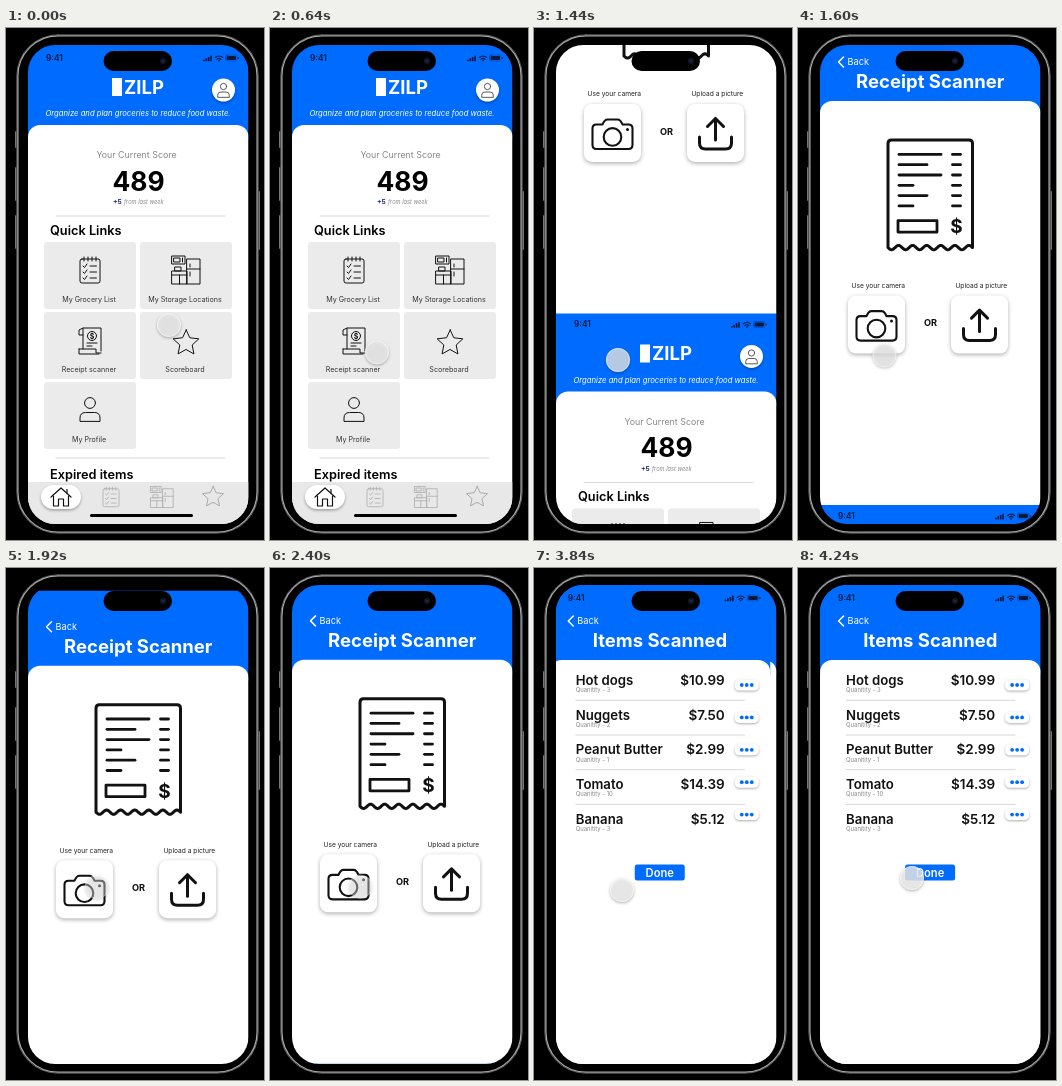
An HTML page with a canvas for the animation above (4.32 s loop, 258 by 512 pixels).

```html
<!DOCTYPE html>
<html lang="en">
<head>
<meta charset="utf-8">
<title>Grocery app</title>
<style>
html, body { margin: 0; width: 100%; height: 100%; overflow: hidden; background: #000; }
canvas { display: block; width: 258px; height: 512px; }
</style>
</head>
<body>
<canvas id="stage"></canvas>
<script>
const W = 258, H = 512, LOOP = 4320;
const SCREEN = { x: 22, y: 17, w: 220.5, h: 479 };
const BOTTOM = SCREEN.y + SCREEN.h;
const BLUE = '#006cff', INK = '#111', NAVY = '#06183f';
const canvas = document.getElementById('stage');
const c = canvas.getContext('2d');
const dpr = window.devicePixelRatio || 1;
canvas.width = W * dpr;
canvas.height = H * dpr;

// ---------- helpers ----------
function at(x, y, draw) {
  c.save();
  c.translate(x, y);
  draw();
  c.restore();
}

function box(x, y, w, h, r, fill) {
  c.beginPath();
  c.roundRect(x, y, w, h, r);
  if (fill) { c.fillStyle = fill; c.fill(); }
}

function disc(x, y, r, fill) {
  c.beginPath();
  c.arc(x, y, r, 0, Math.PI * 2);
  if (fill) { c.fillStyle = fill; c.fill(); }
}

function lifted(draw, blur = 3, dy = 1.5, color = 'rgba(0,0,0,.32)') {
  c.save();
  c.shadowColor = color;
  c.shadowBlur = blur * dpr;
  c.shadowOffsetY = dy * dpr;
  draw();
  c.restore();
}

function line(...p) {
  c.beginPath();
  c.moveTo(p[0], p[1]);
  for (let i = 2; i < p.length; i += 2) c.lineTo(p[i], p[i + 1]);
  c.stroke();
}

function pen(color, width) {
  c.strokeStyle = color;
  c.lineWidth = width;
  c.lineCap = c.lineJoin = 'round';
}

// y is the middle of the capitals
function text(s, x, y, size, { color = INK, weight = 400, align = 'left', style = '' } = {}) {
  c.font = `${style} ${weight} ${size}px Inter, "Liberation Sans", sans-serif`;
  c.textAlign = align;
  c.textBaseline = 'alphabetic';
  c.fillStyle = color;
  c.fillText(s, x, y + size * 0.364);
}

function rule(x1, x2, y, color = '#cfcfcf') {
  pen(color, 0.8);
  line(x1, y, x2, y);
}

// ---------- icons, centred on 0,0 ----------
function listIcon() {
  box(-10, -11, 20, 24, 2); c.stroke();
  for (let x = -6; x <= 6; x += 4) line(x, -13, x, -9);
  for (let y = -4; y <= 8; y += 6) {
    line(-7, y, -5.5, y + 1.5, -3, y - 2);
    line(0, y, 6.5, y);
  }
}

function fridgeIcon() {
  c.strokeRect(1, -11, 13, 25);
  line(1, -1, 14, -1);
  line(4, -6, 4, -3);
  line(4, 2, 4, 6);
  c.strokeRect(-14, -14, 13, 8);
  c.strokeRect(-12, -12, 6, 4);
  line(-3.5, -12, -3.5, -8);
  c.strokeRect(-14, 1, 15, 13);
  line(-14, 5, 1, 5);
  line(-6.5, 5, -6.5, 14);
  c.strokeRect(-11, -3, 6, 4);
}

function starIcon(r) {
  c.beginPath();
  for (let i = 0; i < 10; i++) {
    const a = -Math.PI / 2 + i * Math.PI / 5, d = i % 2 ? r * 0.48 : r;
    c.lineTo(d * Math.cos(a), d * Math.sin(a));
  }
  c.closePath();
  c.stroke();
}

function personIcon() {
  disc(0, -6, 5.4); c.stroke();
  c.beginPath();
  c.moveTo(-10, 12);
  c.lineTo(-10, 9);
  c.quadraticCurveTo(-10, 3.5, -4.5, 3.5);
  c.lineTo(4.5, 3.5);
  c.quadraticCurveTo(10, 3.5, 10, 9);
  c.lineTo(10, 12);
  c.closePath();
  c.stroke();
}

function billIcon() {
  line(-7, 8, -7, -13, 11, -13, 11, 10);
  line(-7, -13, -11, -11, -11, -6, -7, -6);
  line(-11, 8, 6, 8, 6, 12, 11, 12);
  line(-11, 8, -11, 13, 9, 13);
  disc(2, -5, 4.5); c.stroke();
  text('$', 2, -5, 7, { weight: 700, align: 'center' });
  line(-3, 2, 7, 2);
  line(-3, 5, 2, 5);
}

function houseIcon() {
  line(-10, 0, 0, -9, 10, 0);
  line(-7.5, -1, -7.5, 9, -2.5, 9, -2.5, 2, 2.5, 2, 2.5, 9, 7.5, 9, 7.5, -1);
  line(6, -7.5, 6, -4);
}

function cameraIcon() {
  c.beginPath();
  c.moveTo(-16, -8.5);
  c.lineTo(-10, -8.5);
  c.quadraticCurveTo(-8, -13.5, -5, -13.5);
  c.lineTo(5, -13.5);
  c.quadraticCurveTo(8, -13.5, 10, -8.5);
  c.lineTo(16, -8.5);
  c.quadraticCurveTo(20, -8.5, 20, -4.5);
  c.lineTo(20, 12);
  c.quadraticCurveTo(20, 16, 16, 16);
  c.lineTo(-16, 16);
  c.quadraticCurveTo(-20, 16, -20, 12);
  c.lineTo(-20, -4.5);
  c.quadraticCurveTo(-20, -8.5, -16, -8.5);
  c.stroke();
  disc(0, 4, 8.8); c.stroke();
  disc(15, -3.5, 1.5, INK);
}

function uploadIcon() {
  line(0, 7, 0, -14);
  line(-8, -6.5, 0, -14.5, 8, -6.5);
  c.beginPath();
  c.moveTo(-16, 4);
  c.lineTo(-16, 10);
  c.quadraticCurveTo(-16, 16, -10, 16);
  c.lineTo(10, 16);
  c.quadraticCurveTo(16, 16, 16, 10);
  c.lineTo(16, 4);
  c.stroke();
}

// ---------- shared page parts ----------
function page(cardTop) {
  c.fillStyle = BLUE;
  c.fillRect(SCREEN.x, SCREEN.y, SCREEN.w, cardTop + 15 - SCREEN.y);
  box(SCREEN.x, cardTop, SCREEN.w, BOTTOM - cardTop, [12, 12, 0, 0], '#fff');
}

function statusBar() {
  text('9:41', 40, 30, 8.3, { weight: 600, color: NAVY });
  for (let i = 0; i < 4; i++) box(197 + i * 2.4, 31.5 - i * 1.3, 1.7, 1.8 + i * 1.3, 0.4, NAVY);
  pen(NAVY, 1.2);
  for (const r of [2.7, 5]) {
    c.beginPath();
    c.arc(213, 33, r, -Math.PI * 0.75, -Math.PI * 0.25);
    c.stroke();
  }
  disc(213, 32.6, 0.9, NAVY);
  pen('rgba(6,24,63,.5)', 0.6);
  box(219.5, 27, 11.5, 6, 1.7); c.stroke();
  box(220.5, 28, 9.5, 4, 1, NAVY);
  box(231.8, 29, 0.9, 2, 0.4, NAVY);
}

function header(title) {
  pen('#fff', 1.5);
  line(45.5, 48, 40.5, 53, 45.5, 58);
  text('Back', 49.5, 53, 9.2, { color: '#fff' });
  text(title, 132.2, 72.5, 18.5, { color: '#fff', weight: 700, align: 'center' });
}

// ---------- pages ----------
function tile(x, y, label, icon, dy = 0) {
  box(x, y, 92, 67, 3, '#ebebeb');
  pen(INK, 1);
  at(x + 46, y + 28 + dy, icon);
  text(label, x + 45, y + 57.5, 7.15, { align: 'center', color: '#333' });
}

function home() {
  page(97);
  statusBar();
  box(106, 50, 10, 18, 0, '#fff');
  text('ZILP', 118, 59, 18.5, { weight: 700, color: '#fff' });
  lifted(() => disc(217.5, 62, 11.5, '#fff'));
  pen('#333', 1.4);
  at(217.5, 62, () => { c.scale(0.58, 0.58); personIcon(); });
  text('Organize and plan groceries to reduce food waste.', 132, 85.5, 7.7,
    { color: '#fff', style: 'italic', align: 'center' });

  text('Your Current Score', 130.5, 127, 8.85, { color: '#888', align: 'center' });
  text('489', 132.5, 153, 26.4, { weight: 700, align: 'center', color: '#000' });
  text('+5', 107, 174, 6.8, { weight: 700, color: '#1c2f72' });
  text('from last week', 118, 174, 5.7, { style: 'italic', color: '#888' });
  rule(50, 219, 188);
  text('Quick Links', 44, 202, 12.75, { weight: 600, color: '#000' });

  tile(38, 214, 'My Grocery List', listIcon);
  tile(134, 214, 'My Storage Locations', fridgeIcon);
  tile(38, 284, 'Receipt scanner', billIcon, 1);
  tile(134, 284, 'Scoreboard', () => starIcon(13.5), 3);
  tile(38, 354, 'My Profile', personIcon, -1);
  rule(50, 219, 430);
  text('Expired items', 44, 446, 12.75, { weight: 600, color: '#000' });

  c.fillStyle = '#e8e8e8';
  c.fillRect(SCREEN.x, 454, SCREEN.w, BOTTOM - 454);
  lifted(() => box(35, 457, 40, 24, 12, '#fff'));
  pen(INK, 1.2);
  at(55, 469, houseIcon);
  pen('#aaa', 1);
  at(105, 469, () => { c.scale(0.8, 0.75); listIcon(); });
  at(156, 469, () => { c.scale(0.8, 0.75); fridgeIcon(); });
  at(207, 469, () => starIcon(11));
  box(84, 486, 103, 3, 1.5, '#000');
}

function bigReceipt() {
  pen(INK, 3);
  c.beginPath();
  c.moveTo(90, 238.5);
  c.lineTo(90, 134.5);
  c.quadraticCurveTo(90, 131, 93.5, 131);
  c.lineTo(171, 131);
  c.quadraticCurveTo(174.5, 131, 174.5, 134.5);
  c.lineTo(174.5, 238.5);
  for (let k = 0; k <= 84; k++)
    c.lineTo(174.5 - k * 84.5 / 84, 238.5 - 2.2 * Math.sin(k / 84 * Math.PI * 12));
  c.stroke();
  pen(INK, 2.8);
  [42, 28, 42, 14, 28, 14].forEach((len, i) => {
    const y = 145.3 + i * 10.3;
    line(101, y, 101 + len, y);
    line(154.5, y, 162.5, y);
  });
  c.strokeRect(100, 211.5, 39, 11.5);
  text('$', 158.5, 217.3, 19, { weight: 700, align: 'center' });
}

function choice(x, label, icon) {
  text(label, x + 30.3, 276.5, 6.65, { align: 'center', color: '#222' });
  lifted(() => box(x, 286.5, 57, 58, 8, '#fff'), 4, 1.5);
  at(x + 28.5, 315.5, icon);
}

function scanner() {
  page(92);
  header('Receipt Scanner');
  bigReceipt();
  choice(50, 'Use your camera', () => { pen(INK, 2.1); cameraIcon(); });
  choice(153, 'Upload a picture', () => { pen(INK, 3); uploadIcon(); });
  text('OR', 132.6, 313.7, 9.2, { weight: 700, align: 'center' });
}

const GOODS = [
  ['Hot dogs', '$10.99', 3],
  ['Nuggets', '$7.50', 2],
  ['Peanut Butter', '$2.99', 1],
  ['Tomato', '$14.39', 10],
  ['Banana', '$5.12', 3]
];

function items() {
  page(92);
  statusBar();
  header('Items Scanned');
  GOODS.forEach(([name, price, count], i) => {
    const y = 112 + i * 34.7, dotY = 117 + i * 32.4;
    text(name, 48, y, 13.2, { weight: 600 });
    text(price, 197, y, 13.5, { weight: 600, align: 'right' });
    text('Quanitity - ' + count, 48, y + 10, 5.9, { color: '#888' });
    if (i < 4) rule(48, 217, y + 20.3);
    lifted(() => box(207, dotY - 5.5, 24, 11, 4.5, '#fff'), 2.5, 1);
    for (const dx of [-5, 0, 5]) disc(219 + dx, dotY, 1.9, BLUE);
  });
  box(107, 296.5, 50, 16, 2.5, BLUE);
  text('Done', 132, 304.5, 11.2, { weight: 600, align: 'center', color: '#fff' });
}

// ---------- motion ----------
const PUSH_AT = 1280, SLIDE_AT = 3360, TRAVEL = 477;

// damped spring: mass 1, stiffness 100, damping 15
function spring(ms) {
  if (ms <= 0) return 0;
  const t = ms / 1000, w = Math.sqrt(43.75);
  return 1 - Math.exp(-7.5 * t) * (Math.cos(w * t) + 7.5 / w * Math.sin(w * t));
}

// time, x, y, opacity
const POINTER = [
  [0, 163, 297, 0.75], [160, 163, 297, 0.75], [900, 85, 335, 0.75],
  [1200, 85, 335, 0.3], [1440, 84, 332, 0.75], [1840, 91, 319, 0.4],
  [3200, 89, 318, 0.4], [3840, 88, 322, 0.8], [4240, 114, 310, 0.8], [LOOP, 115, 309, 0.8]
];

function pointer(t) {
  const i = POINTER.findIndex(p => p[0] > t);
  const a = POINTER[i - 1], b = POINTER[i];
  const u = (t - a[0]) / (b[0] - a[0]), k = u * u * (3 - 2 * u);
  const [x, y, alpha] = [1, 2, 3].map(n => a[n] + (b[n] - a[n]) * k);
  lifted(() => disc(x, y, 12, `rgba(242,242,242,${alpha})`), 3, 1.2, 'rgba(0,0,0,.35)');
  pen(`rgba(255,255,255,${alpha * 0.7})`, 0.8);
  disc(x, y, 11.6);
  c.stroke();
}

function phone() {
  for (const [x, y, h] of [[9, 103, 17], [9, 139, 34], [9, 187, 34], [252, 163, 59]])
    box(x, y, 2, h, 1, '#777');
  box(10.5, 6.5, 242, 499, 41, '#000');
  pen('#5c5c5c', 1);
  box(10.8, 6.8, 241.4, 498.4, 41); c.stroke();
  pen('#a8a8a8', 1.3);
  box(11.9, 7.9, 239.2, 496.2, 40); c.stroke();
}

function draw(t) {
  c.setTransform(dpr, 0, 0, dpr, 0, 0);
  c.fillStyle = '#000';
  c.fillRect(0, 0, W, H);
  phone();

  c.save();
  box(SCREEN.x, SCREEN.y, SCREEN.w, SCREEN.h, 27);
  c.clip();
  const push = spring(t - PUSH_AT) * TRAVEL;
  if (push < TRAVEL) at(0, push, home);
  if (push > 0) at(0, push - TRAVEL, scanner);
  if (t > SLIDE_AT) at(SCREEN.w * (1 - spring(t - SLIDE_AT)), 0, items);
  pointer(t);
  c.restore();

  box(97.5, 23, 68.5, 20, 10, '#000');
  disc(157, 33, 3.2, '#11131f');
  disc(157, 33, 1.3, '#20284a');
}

const start = performance.now();
function tick() {
  draw((performance.now() - start) % LOOP);
  requestAnimationFrame(tick);
}
tick();
</script>
</body>
</html>
```
